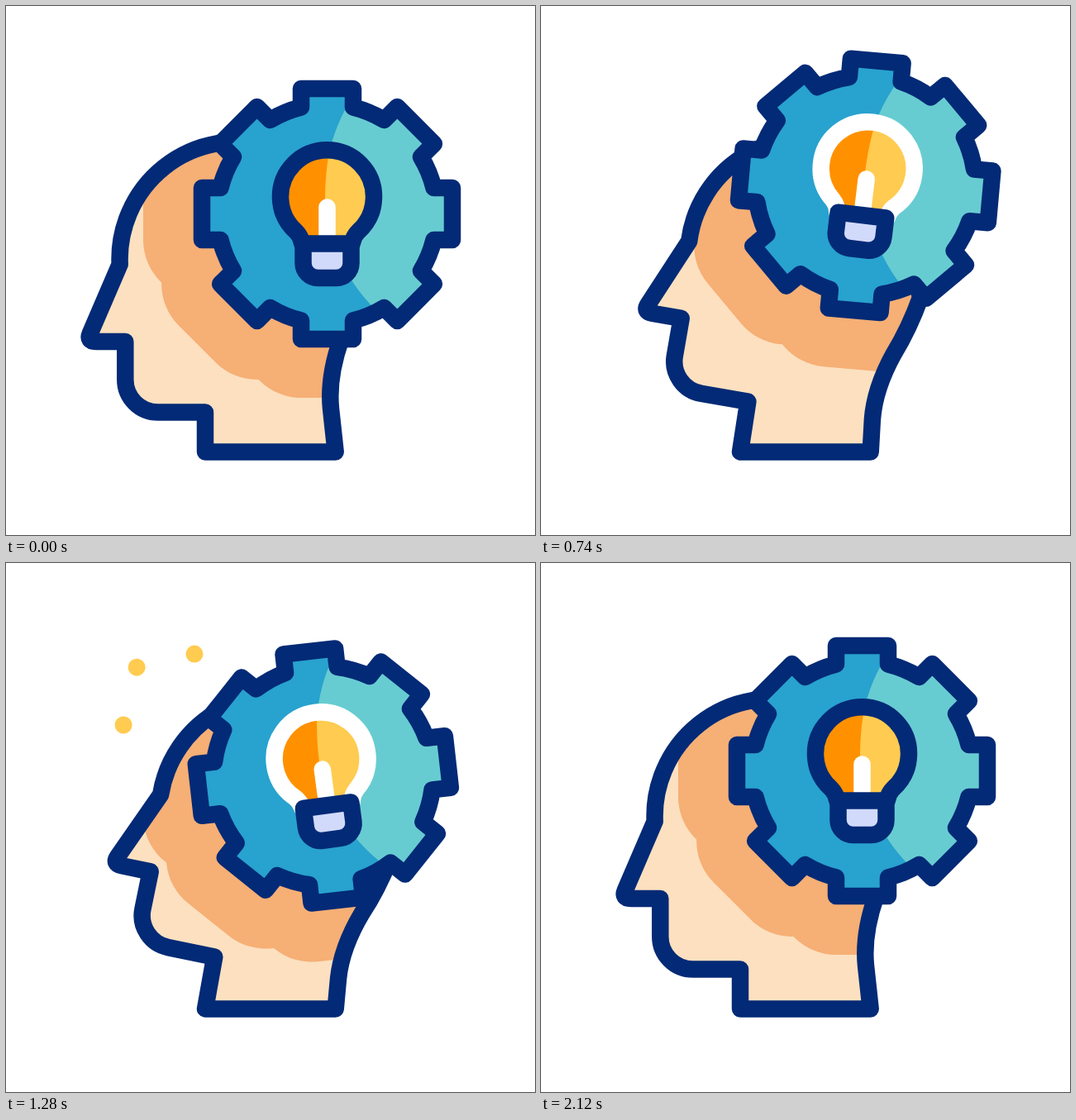
An HTML page that plays this animation: 640x640 px, repeating every 2400 ms.

```html
<!DOCTYPE html>
<html lang="en">
<head>
<meta charset="utf-8">
<title>Creative thinking</title>
<style>
  html, body { margin: 0; width: 100%; height: 100%; overflow: hidden; background: #fff; }
  svg { display: block; width: 100%; height: 100%; }
  .line { fill: none; stroke: #032a76; stroke-width: 20.5; stroke-linejoin: round; stroke-linecap: round; }
</style>
</head>
<body>
<svg viewBox="0 0 640 640">
  <defs>
    <path id="gear"/>
    <path id="head"/>
    <path id="glass" d="M358 287Q357 279 351 273A56.5 56.5 0 1 1 426 273Q420 279 419 287"/>
    <clipPath id="inHead"><use href="#head"/></clipPath>
    <clipPath id="inGear"><use href="#gear" class="spin"/></clipPath>
    <clipPath id="inGlass"><use href="#glass"/></clipPath>
  </defs>

  <g id="dots" fill="#ffcb50"><circle/><circle/><circle/></g>

  <use href="#head" fill="#fce0bf"/>
  <g clip-path="url(#inHead)">
    <g class="sway">
      <use href="#gear" class="spin" fill="#f6af75" stroke="#f6af75" stroke-width="142" stroke-linejoin="round"/>
    </g>
  </g>
  <use href="#head" class="line"/>

  <g class="sway">
    <use href="#gear" class="spin" fill="#28a2ce"/>
    <g clip-path="url(#inGear)"><circle cx="590" cy="222" r="204" fill="#67ccd1"/></g>
    <use href="#gear" class="spin line"/>

    <use href="#glass" fill="#ff9100"/>
    <path d="M392 170Q381 228 390 290H460V170Z" fill="#ffcb50" clip-path="url(#inGlass)"/>
    <path d="M388.5 243.5V284" class="line" style="stroke:#fff"/>
    <use href="#glass" class="line" id="rim"/>
    <path d="M359.5 287.5H417.5V311A18 18 0 0 1 399.5 329H377.5A18 18 0 0 1 359.5 311Z" class="line" style="fill:#d1dafb"/>
  </g>
</svg>

<script>
const LOOP = 2400;
const $ = id => document.getElementById(id);
const all = selector => [...document.querySelectorAll(selector)];
const clamp = v => Math.min(1, Math.max(0, v));
const span = (t, from, to) => clamp((t - from) / (to - from));
const easeOut = (p, power) => 1 - (1 - p) ** power;

// Rotates x, y clockwise around cx, cy and returns path-ready text.
function turn(x, y, degrees, cx = 0, cy = 0) {
  const a = degrees * Math.PI / 180, c = Math.cos(a), s = Math.sin(a);
  const dx = x - cx, dy = y - cy;
  return `${(cx + dx * c - dy * s).toFixed(2)} ${(cy + dx * s + dy * c).toFixed(2)}`;
}

// Value at time t on [time, value] keys joined by sine ease-in-out.
function track(t, keys) {
  let [t0, v0] = keys[0];
  for (const [t1, v1] of keys) {
    if (t < t1) {
      const p = span(t, t0, t1);
      return v0 + (v1 - v0) * (1 - Math.cos(Math.PI * p)) / 2;
    }
    [t0, v0] = [t1, v1];
  }
  return v0;
}

const BOB = [[0, 0], [450, 36], [735, -34.5], [1000, 38], [1530, -21], [1760, 13.2], [2110, 0]];
const TILT = [[0, 0], [440, -16], [880, 13.5], [1310, -7.8], [1740, 3.5], [2120, 0]];
const SPIN = [[140, 0], [880, -51], [1310, -43.8], [1740, -45]];
const NOD = [[100, 0], [960, 11.6], [1284, 11.6], [1984, 0]];

function gearPath() {
  let d = '';
  for (let a = 0; a < 360; a += 45) {
    const p = (x, y) => turn(x, y, a);
    d += `${a ? 'A133 133 0 0 1 ' : 'M'}${p(-31.5, -129)}L${p(-31.5, -151.5)}L${p(31.5, -151.5)}L${p(31.5, -129)}`;
  }
  return d + `A133 133 0 0 1 ${turn(-31.5, -129, 0)}Z`;
}

// The base stays put while everything above it leans around its middle.
function headPath(lean) {
  const p = (x, y) => turn(x, y, lean, 320, 539.5);
  return `M241 539.5H398.7L${p(393, 487)}` +
    `C${p(390, 457)} ${p(396, 430)} ${p(405, 404)}` +
    `C${p(413, 384)} ${p(420, 360)} ${p(425, 332)}` +
    `L${p(395, 250)}L${p(318, 169.5)}A142 142 0 0 0 ${p(137.7, 312.5)}` +
    `L${p(101.8, 396)}Q${p(97.5, 406)} ${p(109, 406)}` +
    `L${p(144.3, 406)}L${p(144.3, 452)}A39.5 39.5 0 0 0 ${p(183.8, 491.5)}` +
    `L${p(241, 491.5)}Z`;
}

function placeDots(t) {
  const p = span(t, 780, 1400);
  const straight = 86.5 * easeOut(p, 3);
  const diagonal = 72.5 * easeOut(p, 2);
  const r = 10.5 * span(t, 800, 880) * (1 - span(t, 1380, 1560));
  const offsets = [[straight, 0], [diagonal, diagonal], [0, straight]];
  [...$('dots').children].forEach((dot, i) => {
    dot.setAttribute('cx', 228 - offsets[i][0]);
    dot.setAttribute('cy', 196 - offsets[i][1]);
    dot.setAttribute('r', r);
  });
}

const swaying = all('.sway'), spinning = all('.spin');

function draw(t) {
  const sway = `translate(0 ${track(t, BOB)}) rotate(${track(t, TILT)} 388.5 287)`;
  const spin = `translate(388.5 251.5) rotate(${track(t, SPIN)})`;
  swaying.forEach(el => el.setAttribute('transform', sway));
  spinning.forEach(el => el.setAttribute('transform', spin));
  $('head').setAttribute('d', headPath(track(t, NOD)));
  $('rim').style.stroke = t >= 600 && t < 1960 ? '#fff' : '#032a76';
  placeDots(t);
}

function frame() {
  draw(performance.now() % LOOP);
  requestAnimationFrame(frame);
}

$('gear').setAttribute('d', gearPath());
frame();
</script>
</body>
</html>
```
